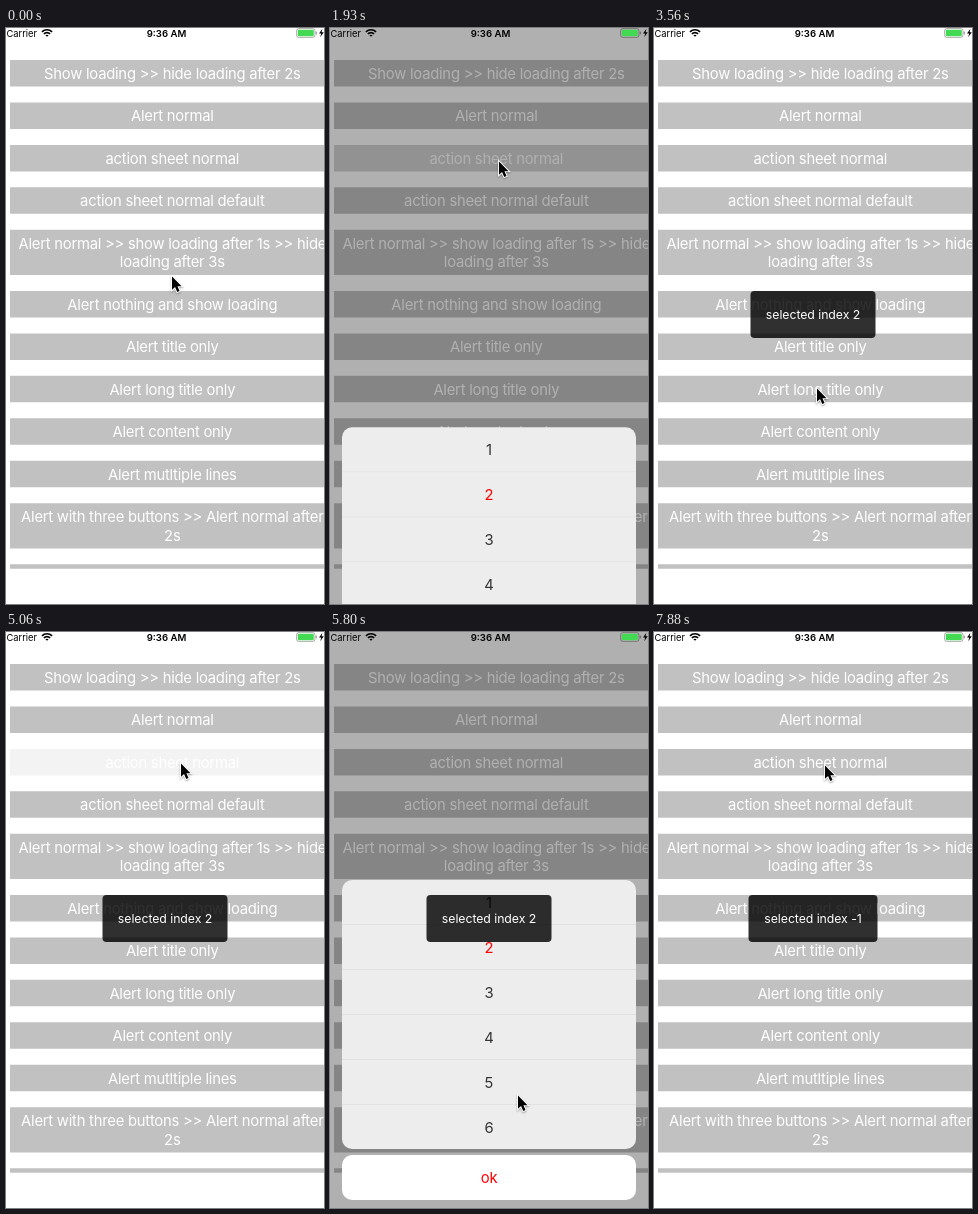
Write an HTML page with a canvas that moves like this. It is 318x576 px and loops after 8 s.

```html
<!DOCTYPE html>
<html lang="en">
<head>
<meta charset="utf-8">
<title>Action sheet demo</title>
<style>
  html, body { margin: 0; width: 100%; height: 100%; overflow: hidden; background: #fff; }
  canvas { display: block; width: 318px; height: 576px; }
</style>
</head>
<body>
<canvas id="stage"></canvas>
<script>
const W = 318, H = 576, LOOP = 8000, TICK = 148.7;
const FONT = 'Inter, "Open Sans", sans-serif';
const ROW = 45, TRAVEL = 330, TOAST_TICKS = 18;
const canvas = document.getElementById('stage');
const ctx = canvas.getContext('2d');
const dpr = window.devicePixelRatio || 1;
canvas.width = W * dpr;
canvas.height = H * dpr;

const buttons = [
  ['Show loading >> hide loading after 2s'],
  ['Alert normal'],
  ['action sheet normal'],
  ['action sheet normal default'],
  ['Alert normal >> show loading after 1s >> hide', 'loading after 3s'],
  ['Alert nothing and show loading'],
  ['Alert title only'],
  ['Alert long title only'],
  ['Alert content only'],
  ['Alert mutltiple lines'],
  ['Alert with three buttons >> Alert normal after', '2s'],
];

// Times are in ticks: the screen refreshes once per tick.
const sessions = [
  { press: 12, close: 21, index: 2 },
  { press: 34, close: 44, index: -1 },
];

const home = { x: 165, y: 247 };
const moves = [
  { from: 1, to: 5, x: 170, y: 123 },
  { from: 5, to: 7, x: 168, y: 132 },
  { from: 15, to: 21, x: 162, y: 359 },
  { from: 29, to: 33, x: 174, y: 130 },
  { from: 36, to: 39, x: 187, y: 462 },
  { from: 39, to: 44, x: 164, y: 533 },
  { from: 48, to: 53, x: 170, y: 132 },
];

const clamp = v => Math.min(1, Math.max(0, v));
const smooth = p => p * p * (3 - 2 * p);

function pointerAt(k) {
  let { x, y } = home;
  for (const m of moves) {
    const e = smooth(clamp((k - m.from) / (m.to - m.from)));
    x += (m.x - x) * e;
    y += (m.y - y) * e;
  }
  return [x, y];
}

// The sheet takes two ticks to rise or fall.
const ease = k => clamp(k / 2) ** 0.885;
const sheetOffset = (s, k) => TRAVEL * (1 - ease(k - s.press) + ease(k - s.close));

function text(str, x, y, size, color, spacing = 0, weight = 400, align = 'center') {
  ctx.font = `${weight} ${size}px ${FONT}`;
  ctx.letterSpacing = spacing + 'px';
  ctx.textAlign = align;
  ctx.fillStyle = color;
  ctx.fillText(str, x, y);
}

function box(x, y, w, h, r, color) {
  ctx.fillStyle = color;
  ctx.beginPath();
  ctx.roundRect(x, y, w, h, r);
  ctx.fill();
}

function poly(points) {
  ctx.beginPath();
  points.forEach(([x, y]) => ctx.lineTo(x, y));
  ctx.closePath();
}

function drawList(pressed) {
  let y = 32;
  buttons.forEach((lines, i) => {
    const h = lines.length > 1 ? 45.2 : 26.5;
    ctx.globalAlpha = i === 2 ? pressed : 1;
    box(4, y, 325, h, 0, '#c1c1c1');
    ctx.globalAlpha = 1;
    lines.forEach((line, j) => {
      const mid = y + h / 2 + (j - (lines.length - 1) / 2) * 18.6;
      text(line, 166.3, mid + 5.6, 14.8, '#fff', -0.24);
    });
    y += h + 15.95;
  });
  box(4, y, 325, 4.5, 0, '#c1c1c1');
}

function drawSheet(offset) {
  const top = 248 + offset;
  box(12, top, 294, 269, 10, '#ededed');
  for (let i = 0; i < 6; i++) {
    const y = top + i * ROW;
    if (i) box(12, y - 0.9, 294, 0.9, 0, '#e1e1e1');
    text(i + 1, 159, y + 28, 14.8, i === 1 ? '#f00' : '#333');
  }
  box(12, top + 275, 294, ROW, 10, '#fff');
  text('ok', 159, top + 303, 14.8, '#f00', -0.24);
}

function drawToast(index) {
  const w = index < 0 ? 129 : 125;
  box(159 - w / 2, 263, w, 47, 4, 'rgba(0,0,0,.81)');
  text('selected index ' + index, 159, 291, 12.3, '#fff', -0.06);
}

function drawStatus() {
  text('Carrier', 0.5, 9, 9.3, '#000', 0, 400, 'left');
  text('9:36 AM', 160.5, 9, 9.6, '#000', 0, 600);

  // Wi-Fi fan
  ctx.strokeStyle = '#000';
  ctx.lineWidth = 1.6;
  for (const r of [1.4, 4.4, 7.2]) {
    ctx.beginPath();
    ctx.arc(41, 9, r, -Math.PI * 0.75, -Math.PI * 0.25);
    ctx.stroke();
  }

  // Battery
  ctx.strokeStyle = 'rgba(0,0,0,.4)';
  ctx.lineWidth = 0.8;
  ctx.beginPath();
  ctx.roundRect(290.6, 0.6, 18.4, 8.8, 2.2);
  ctx.stroke();
  box(291.8, 1.8, 16, 6.4, 1.2, '#43d953');
  box(309.8, 3.6, 1.1, 2.8, 0.6, 'rgba(0,0,0,.4)');
  poly([[316.4, 0.8], [313, 5.4], [315.2, 5.4], [314.2, 9.2], [317.8, 4.3], [315.6, 4.3]]);
  ctx.fillStyle = '#000';
  ctx.fill();
}

function drawPointer(x, y) {
  ctx.save();
  ctx.translate(x + 1, y + 1.4);
  ctx.scale(0.92, 0.92);
  poly([[0, 0], [0, 14.6], [3.3, 11.5], [5.7, 17], [8.2, 15.9], [5.9, 10.6], [10.4, 10.6]]);
  ctx.shadowColor = 'rgba(0,0,0,.35)';
  ctx.shadowBlur = 2 * dpr;
  ctx.shadowOffsetY = dpr;
  ctx.strokeStyle = '#fff';
  ctx.lineWidth = 2;
  ctx.stroke();
  ctx.shadowColor = 'transparent';
  ctx.fillStyle = '#000';
  ctx.fill();
  ctx.restore();
}

function draw(ms) {
  const k = Math.floor((ms % LOOP + 20) / TICK);
  const last = sessions.filter(s => k >= s.press).pop();
  ctx.setTransform(dpr, 0, 0, dpr, 0, 0);
  box(0, 0, W, H, 0, '#fff');
  drawList(last ? Math.min(1, 0.2 + 0.5 * (k - last.press)) : 1);

  for (const s of sessions) {
    if (k <= s.press || k >= s.close + 3) continue;
    box(0, 0, W, H, 0, 'rgba(0,0,0,.31)');
    drawSheet(sheetOffset(s, k));
  }
  for (const s of sessions) {
    const age = k - s.close - 3;
    if (age >= 0 && age < TOAST_TICKS) drawToast(s.index);
  }
  drawStatus();
  drawPointer(...pointerAt(k));
}

const start = performance.now();
function loop() {
  draw(performance.now() - start);
  requestAnimationFrame(loop);
}
loop();
</script>
</body>
</html>
```
